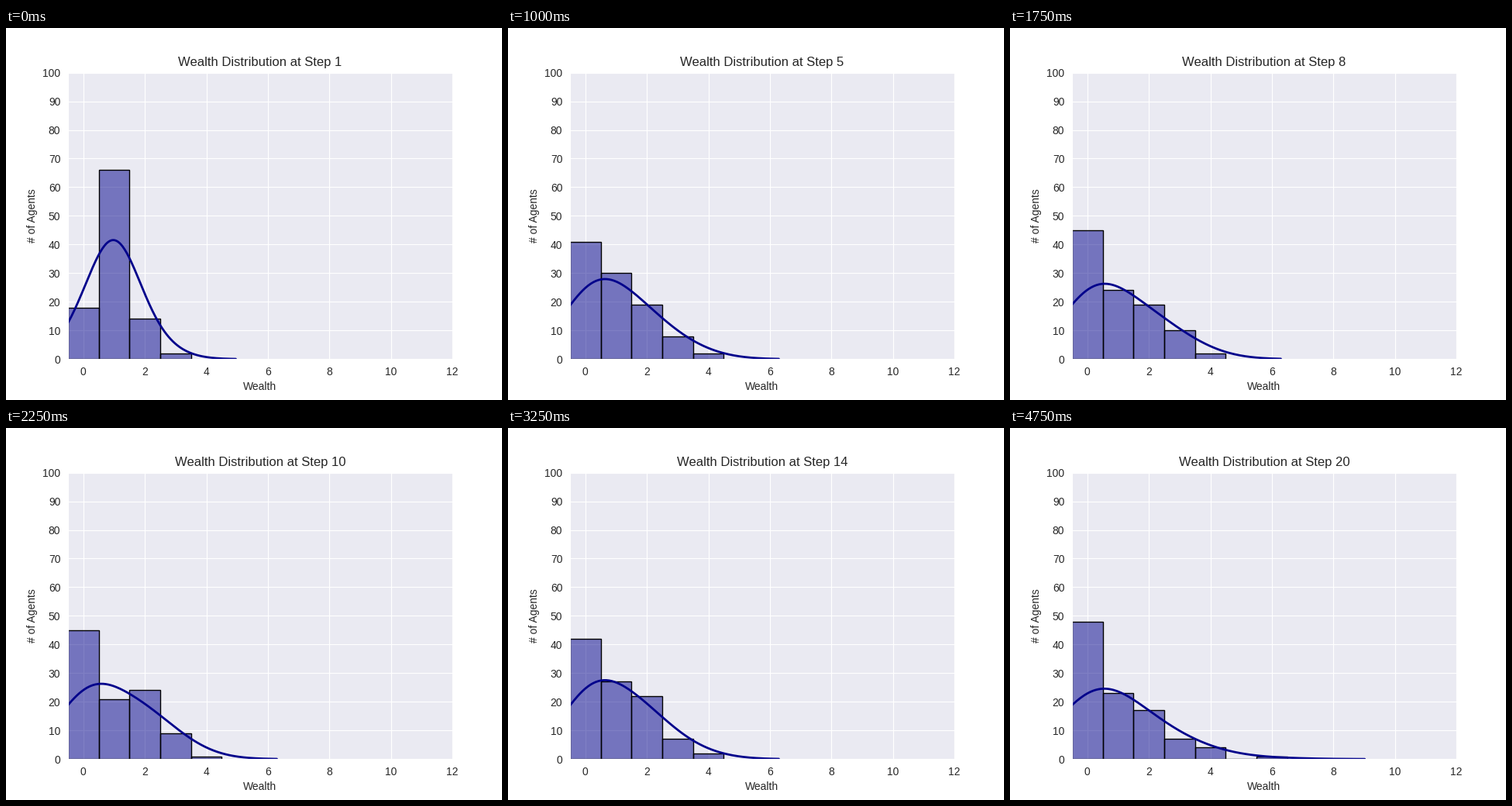
Animation, 640 px wide and 480 px high, one loop 5000 ms. Source, as a matplotlib script:

```python
import numpy as np
import matplotlib.pyplot as plt
from matplotlib.animation import FuncAnimation

plt.rcParams.update({
    "font.family": "Liberation Sans",
    "font.size": 10,
    "text.color": ".15",
    "axes.labelcolor": ".15",
    "xtick.color": ".15",
    "ytick.color": ".15",
    "axes.facecolor": "#EAEAF2",
    "axes.edgecolor": "white",
    "axes.axisbelow": True,
    "axes.grid": True,
    "grid.color": "white",
    "xtick.bottom": False,
    "ytick.left": False,
    "lines.solid_capstyle": "round",
})

N_STEPS = 20
AGENTS = COINS = 100
RICH = np.arange(2, 7)  # wealth levels whose counts are keyed

# Step -> number of agents holding 2, 3, 4, ... coins.
KEYS = {
    1: (14, 2),
    3: (22, 5, 1),
    7: (16, 10, 2),
    10: (24, 9, 1),
    14: (22, 7, 2),
    15: (22, 7, 2),
    17: (20, 8, 3),
    18: (22, 7, 3),
    20: (17, 7, 4, 0, 1),
}


def counts_at(step):
    """Blend the rich counts; fixed totals then give those with 1 and 0 coins."""
    rows = [row + (0,) * (len(RICH) - len(row)) for row in KEYS.values()]
    rich = np.round([np.interp(step, list(KEYS), col) for col in zip(*rows)])
    ones = COINS - (RICH * rich).sum()
    zeros = AGENTS - ones - rich.sum()
    return np.array([zeros, ones, *rich])


def density(counts):
    """Weighted Gaussian KDE (Scott's rule), scaled to agent counts."""
    x = np.flatnonzero(counts)
    w = counts[x] / AGENTS

    sum_sq = (w ** 2).sum()
    var = (w * (x - (w * x).sum()) ** 2).sum() / (1 - sum_sq)
    h = np.sqrt(var) * sum_sq ** 0.2

    # The curve's extent follows the unweighted bandwidth.
    reach = 2 * x.std(ddof=1) * len(x) ** -0.2
    grid = np.linspace(x.min() - reach, x.max() + reach, 200)
    z = (grid[:, None] - x) / h
    y = (w * np.exp(-z ** 2 / 2)).sum(axis=1) / (h * np.sqrt(2 * np.pi))
    return grid, AGENTS * y


fig, ax = plt.subplots(figsize=(6.4, 4.8), dpi=100)
ax.set(xlim=(-0.5, 12), ylim=(0, 100), xlabel="Wealth")
ax.set_ylabel("# of Agents", labelpad=4.7)
ax.set_xticks(range(0, 13, 2))
ax.set_yticks(range(0, 101, 10))

levels = np.arange(RICH[-1] + 1)
bars = ax.bar(levels, 0 * levels, width=1, linewidth=1,
              facecolor=(0, 0, 139 / 255, 0.5), edgecolor="black")
curve, = ax.plot([], [], color="darkblue", linewidth=2)
title = ax.set_title("", fontsize=12)


def draw(i):
    step = i + 1
    counts = counts_at(step)
    richest = np.flatnonzero(counts).max()
    for level, (bar, count) in enumerate(zip(bars, counts)):
        bar.set_height(count)
        bar.set_visible(level <= richest)
    curve.set_data(*density(counts))
    title.set_text(f"Wealth Distribution at Step {step}")
    return [*bars, curve, title]


anim = FuncAnimation(fig, draw, frames=N_STEPS, interval=250,
                     repeat=True, repeat_delay=0, blit=False)
plt.show()
```
